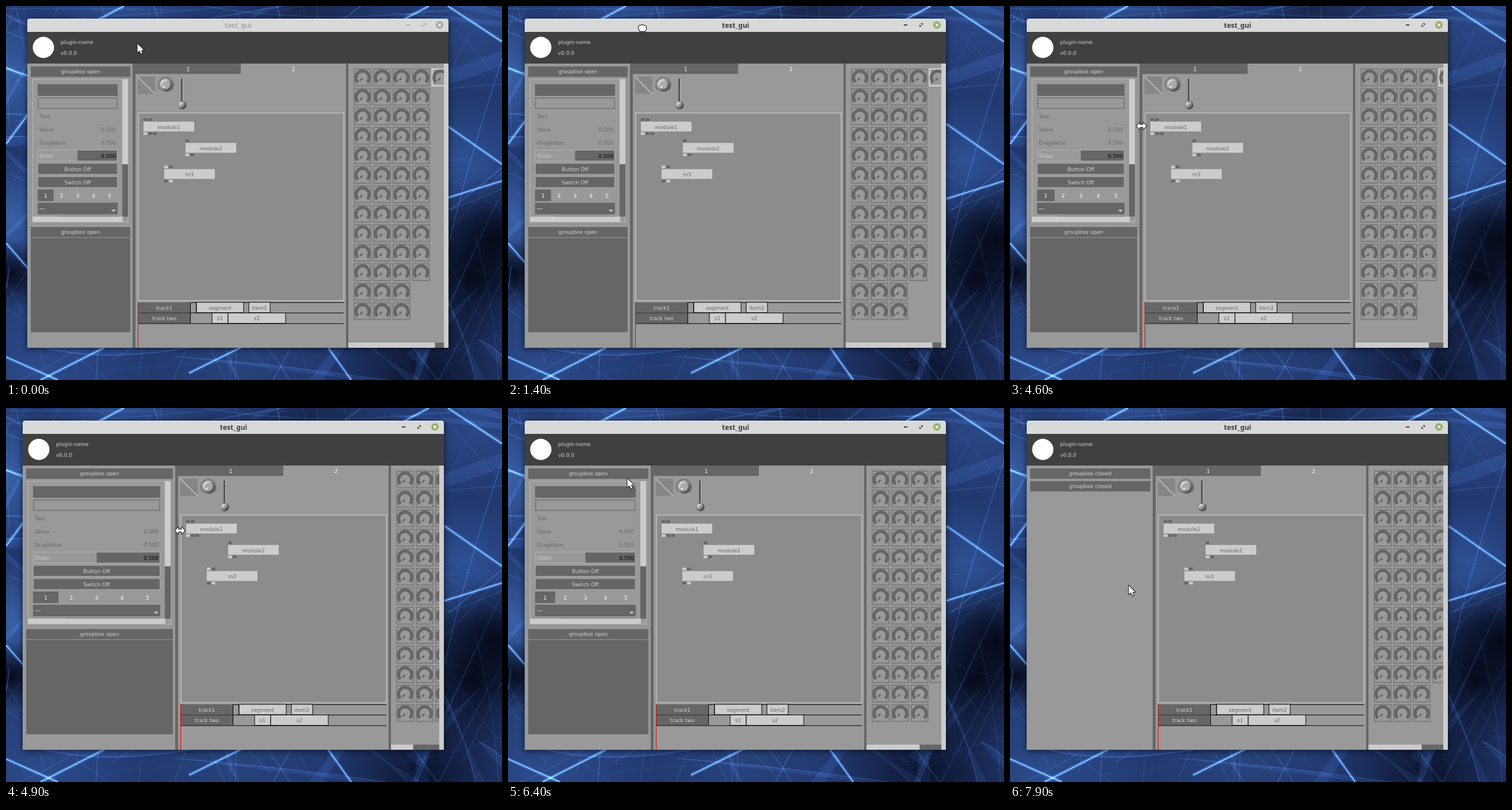
An HTML page with a canvas that plays this animation: 862 by 650 pixels, repeating every 8000 ms.

```html
<!DOCTYPE html>
<html lang="en">
<head>
<meta charset="utf-8">
<title>test_gui</title>
<style>
html, body { margin: 0; width: 100%; height: 100%; overflow: hidden; background: #1c3162; }
canvas { display: block; }
</style>
</head>
<body>
<canvas id="stage" width="862" height="650"></canvas>
<script>
const WIDTH = 862, HEIGHT = 650, LOOP = 8000, STEP = 100;
const BG = '#999', DARK = '#666', LIGHT = '#ccc', TEXT = '#d2d2d2', FONT = '9px "DejaVu Sans", sans-serif';
const stage = document.getElementById('stage').getContext('2d');
let ctx = stage;

// Motion keys: [time, ...values]; values between keys are linear.
const cursorKeys = [
  [0, 228, 65], [100, 228, 58], [200, 228, 58], [500, 241, 38], [1000, 236, 38],
  [1300, 236, 38], [1400, 233, 38], [1500, 233, 38], [1900, 300, 290], [2400, 618, 175],
  [2500, 634, 175], [3600, 634, 175], [3700, 221, 206], [3900, 221, 206], [4100, 214, 206],
  [4500, 214, 206], [4600, 228, 208], [4700, 228, 208], [4900, 302, 212.5], [5100, 305, 213],
  [5600, 305, 213], [5700, 293, 214.5], [6100, 250, 211], [6400, 207, 122], [6500, 204, 97],
  [6600, 203, 93], [6800, 204, 111], [7000, 204, 111], [7200, 204, 132], [7500, 204, 132],
  [7900, 206, 308]
];
const windowKeys = [[0, 8], [500, 8], [1000, 3], [1300, 3], [1400, 0]];
const paneKeys = [[0, 0], [4500, 0], [4600, 13], [4700, 13], [4900, 82], [5000, 90],
  [5600, 90], [5700, 82], [6100, 36]];

function sample(keys, t) {
  const next = keys.findIndex(k => k[0] > t);
  if (next < 0) return keys[keys.length - 1].slice(1);
  const a = keys[next - 1], b = keys[next], p = (t - a[0]) / (b[0] - a[0]);
  return a.slice(1).map((v, i) => v + (b[i + 1] - v) * p);
}

// Drawing helpers; boxes are given by their left, top, right and bottom edges.
function box(x0, y0, x1, y1, color) {
  ctx.fillStyle = color;
  ctx.fillRect(x0, y0, x1 - x0, y1 - y0);
}
function frame(x0, y0, x1, y1, color, width = 1) {
  ctx.strokeStyle = color;
  ctx.lineWidth = width;
  ctx.strokeRect(x0 + width / 2, y0 + width / 2, x1 - x0 - width, y1 - y0 - width);
}
function label(text, x, y, color = TEXT, align = 'center', font = FONT) {
  ctx.font = font;
  ctx.textAlign = align;
  ctx.fillStyle = color;
  ctx.fillText(text, x, y + 3.5);
}
function line(points, color, width = 1) {
  ctx.beginPath();
  points.forEach(([x, y]) => ctx.lineTo(x, y));
  ctx.strokeStyle = color;
  ctx.lineWidth = width;
  ctx.stroke();
}
function disc(x, y, r, fill) {
  ctx.beginPath();
  ctx.arc(x, y, r, 0, 7);
  ctx.fillStyle = fill;
  ctx.fill();
}
function ring(x, y, r, color, width, from = 0, to = 2 * Math.PI) {
  ctx.beginPath();
  ctx.arc(x, y, r, from, to);
  ctx.strokeStyle = color;
  ctx.lineWidth = width;
  ctx.stroke();
}
function ball(x, y, r) {
  const shade = ctx.createLinearGradient(x - r, y - r, x + r, y + r);
  shade.addColorStop(0.15, '#eee');
  shade.addColorStop(0.5, '#999');
  shade.addColorStop(0.9, '#444');
  disc(x, y, r, shade);
}
function clipped(x0, y0, x1, y1, draw) {
  ctx.save();
  ctx.beginPath();
  ctx.rect(x0, y0, x1 - x0, y1 - y0);
  ctx.clip();
  draw();
  ctx.restore();
}

// Wallpaper: soft colour areas crossed by seeded, glowing curves.
function paintWallpaper() {
  let seed = 41;
  const random = (a, b) => {
    seed = (seed * 16807) % 2147483647;
    return a + (b - a) * seed / 2147483647;
  };
  box(0, 0, WIDTH, HEIGHT, '#22396f');
  const glow = (x, y, r, color) => {
    const g = ctx.createRadialGradient(x, y, 0, x, y, r);
    g.addColorStop(0, `rgba(${color},.95)`);
    g.addColorStop(1, `rgba(${color},0)`);
    ctx.fillStyle = g;
    ctx.fillRect(x - r, y - r, 2 * r, 2 * r);
  };
  const bright = '58,98,168', night = '5,9,24';
  glow(0, 120, 130, bright);
  glow(10, 370, 110, bright);
  glow(200, 0, 150, '46,78,142');
  glow(60, 640, 190, '45,76,140');
  glow(400, 620, 150, '40,68,124');
  glow(820, 20, 130, '44,74,136');
  glow(800, 270, 110, '46,82,150');
  glow(10, 465, 60, night);
  glow(850, 405, 110, night);
  glow(810, 470, 130, night);
  glow(730, 640, 170, '10,18,42');
  glow(530, 5, 130, '24,38,74');

  ctx.globalCompositeOperation = 'lighter';
  for (let i = 0; i < 130; i++) {
    const x = random(-60, 920), y = random(-40, 690), angle = random(0, Math.PI), length = random(80, 300);
    const dx = Math.cos(angle) * length, dy = Math.sin(angle) * length;
    const bend = random(-50, 50), alpha = random(.04, .2);
    ctx.beginPath();
    ctx.moveTo(x - dx, y - dy);
    ctx.quadraticCurveTo(x + bend, y - bend, x + dx, y + dy);
    ctx.strokeStyle = `rgba(110,165,240,${alpha})`;
    ctx.lineWidth = random(.5, 2);
    ctx.stroke();
    if (i % 3 === 0) {
      ctx.lineTo(x + dx * .7 + bend, y + dy * .7);
      ctx.fillStyle = 'rgba(70,120,210,.1)';
      ctx.fill();
    }
  }
  const streaks = [
    [762, 335, 862, 304], [318, 638, 415, 590], [0, 108, 40, 122], [0, 412, 40, 458],
    [768, 0, 862, 62], [690, 24, 735, 0], [160, 24, 205, 0], [762, 205, 862, 275],
    [60, 650, 170, 594], [0, 610, 90, 650], [560, 594, 600, 650], [0, 240, 37, 190]
  ];
  for (const [x0, y0, x1, y1] of streaks) {
    line([[x0, y0], [x1, y1]], 'rgba(80,140,230,.25)', 6);
    line([[x0, y0], [x1, y1]], 'rgba(140,195,255,.6)', 1.5);
  }
  ctx.globalCompositeOperation = 'source-over';
}

function drawTitleBar(active) {
  ctx.save();
  ctx.shadowColor = 'rgba(0,0,0,.65)';
  ctx.shadowBlur = 11;
  ctx.shadowOffsetY = 2;
  ctx.beginPath();
  ctx.roundRect(29, 22, 732, 572, [4, 4, 0, 0]);
  ctx.fillStyle = '#d9d9d9';
  ctx.fill();
  ctx.restore();
  box(32, 22, 758, 23, '#eee');

  const ink = active ? '#3c3c3c' : '#aaa';
  label('test_gui', 395.5, 34.5, ink, 'center', 'bold 12px "Noto Sans", sans-serif');
  box(688, 32, 694, 34, ink);
  ctx.fillStyle = ink;
  for (const s of [1, -1]) {
    ctx.beginPath();
    ctx.moveTo(718 + 3 * s, 33 - 3 * s);
    ctx.lineTo(718 - s, 33 - 3 * s);
    ctx.lineTo(718 + 3 * s, 33 + s);
    ctx.fill();
  }
  disc(745.5, 33, 6.5, active ? '#90ae6b' : '#a6a6a6');
  for (const s of [1, -1]) line([[743, 33 - 2.5 * s], [748, 33 + 2.5 * s]], '#fff', 1.6);
}

function drawHeader() {
  box(29, 45, 761, 100, '#404040');
  disc(57, 72, 18.5, '#fff');
  label('plugin-name', 87, 62, TEXT, 'left');
  label('v0.0.0', 87, 81.5, TEXT, 'left');
  box(29, 100, 761, 594, BG);
}

function drawGroupHeader(y, closed, shift) {
  box(35, y, 208 + shift, y + 18, DARK);
  label(closed ? 'groupbox closed' : 'groupbox open', 121.5 + shift / 2, y + 8);
}

function drawControls(shift) {
  const left = 47, right = 186 + shift, width = right - left, middle = (left + right) / 2;
  frame(34, 123, 209 + shift, 380, '#8d8d8d');
  frame(38, 127, 204 + shift, 376, '#b5b5b5');
  box(left, 136, right, 156, DARK);
  frame(left, 159, right, 179, '#7b7b7b', 2);
  label('Text', 50, 191.5, DARK, 'left');
  [['Value', 214], ['DragValue', 237]].forEach(([name, y]) => {
    label(name, 50, y, DARK, 'left');
    label('0.500', right - 3, y, DARK, 'right');
  });
  box(middle, 250, right, 270, DARK);
  frame(left, 250, right, 270, '#b3b3b3');
  label('Slider', 50, 260, LIGHT, 'left');
  label('0.500', right - 3, 260, '#000', 'right');
  [['Button Off', 273], ['Switch Off', 296]].forEach(([name, y]) => {
    box(left, y, right, y + 20, DARK);
    frame(left, y, right, y + 20, '#aaa');
    label(name, middle, y + 10);
  });
  box(left, 319, left + width / 5, 339, DARK);
  for (let i = 0; i < 5; i++) label(i + 1, left + width * (i + .5) / 5, 329, '#fff');
  box(left, 342, right, 362, DARK);
  label('---', 50, 351.5, '#fff', 'left');
  ctx.fillStyle = LIGHT;
  ctx.beginPath();
  ctx.moveTo(right - 11, 354);
  ctx.lineTo(right - 3, 354);
  ctx.lineTo(right - 7, 358);
  ctx.fill();

  box(left + width / 4, 365, right, 366, '#777');
  box(194 + shift, 127, 204 + shift, 275, LIGHT);
  box(194 + shift, 275, 204 + shift, 366, DARK);
  box(38, 366, 195 + shift, 375, LIGHT);
}

function drawLeftPane(shift, t) {
  const firstClosed = t >= 7000, secondClosed = t >= 7500;
  drawGroupHeader(105, firstClosed, shift);
  if (!firstClosed) drawControls(shift);
  const y = firstClosed ? 127 : 384;
  drawGroupHeader(y, secondClosed, shift);
  if (!secondClosed) box(35, y + 19, 208 + shift, y + 183, DARK);
}

function drawPins(x, y, colors) {
  colors.forEach((color, i) => box(x + 8.2 * i, y, x + 8.2 * i + 6.5, y + 4.5, color));
}
function drawModule(name, x, y, inputs, outputs) {
  drawPins(x, y - 6, inputs);
  box(x, y, x + 88, y + 17, LIGHT);
  label(name, x + 44, y + 9, DARK);
  drawPins(x, y + 18.5, outputs);
}

function drawTrack(y, name, segments) {
  box(222, y, 313, y + 18, DARK);
  label(name, 267, y + 9);
  line([[312.5, y], [312.5, y + 18]], '#000');
  for (const [text, x0, x1] of segments) {
    box(x0, y, x1, y + 18, LIGHT);
    frame(x0 - .5, y - .5, x1 + .5, y + 18.5, '#000');
    label(text, (x0 + x1) / 2, y + 9, DARK);
  }
  box(222, y + 18, 579, y + 19, '#000');
}

function drawCenterPane(moved) {
  box(212, 100, 217, 594, DARK);
  box(583, 100, 587, 594, DARK);
  box(217, 100, 400, 118, DARK);
  label('1', 308.5, 109, '#fff');
  label('2', 491.5, 109, '#fff');

  box(221, 123, 251, 153, '#868686');
  line([[221, 123], [251, 153]], LIGHT, 1.3);
  ring(270, 137, 13, '#777', 2, Math.PI * .75, Math.PI * 2.25);
  disc(271, 138, 11, '#5c5c5c');
  ball(270, 137, 10);
  disc(270, 137, 7, '#aaa');
  line([[268, 139], [265, 142]], '#fff', 2);
  box(296, 126, 299, 170, '#555');
  box(299, 126, 300, 170, '#bbb');
  disc(298.5, 172.5, 7, '#444');
  ball(298, 172, 6);

  box(221, 185, 580, 513, '#8c8c8c');
  frame(221, 185, 580, 513, '#b5b5b5', 2);
  drawModule('module1', 231, 201, [DARK, DARK], [LIGHT, DARK, DARK]);
  drawModule('module2', 304, 238, [DARK], [LIGHT, DARK]);
  drawModule('m3', 267, 283.5, [LIGHT, DARK], [DARK, LIGHT]);

  box(313, 515, 579, 516, '#000');
  drawTrack(515, 'track1', [['segment', 323, 405], ['item2', 414, 451]]);
  line([[322.5, 515], [322.5, 533]], '#000');
  drawTrack(533.5, 'track two', [['s1', 350, 378], ['s2', 378, 478]]);
  box(221, 515, 222, 594, moved ? '#e60000' : '#b01a1a');
}

function drawDial(x, y, selected) {
  frame(x - 15.5, y - 15.5, x + 15.5, y + 15.5, selected ? '#ddd' : '#7b7b7b', 2);
  ring(x, y + .5, 11.5, DARK, 5.5, Math.PI * .75, Math.PI * 2.25);
  line([[x - .5, y + 1.5], [x - 4, y + 5.5]], DARK, 3);
}

function drawRightPane(shift) {
  const left = 587 + shift, right = 753, pitch = 33.85;
  clipped(left, 100, right, 585, () => {
    for (let row = 0; row < 13; row++) {
      const count = row === 0 ? 5 : row < 11 ? 4 : 3;
      for (let col = 0; col < count; col++)
        drawDial(611.7 + shift + col * pitch, 124 + row * pitch, col === 4);
    }
  });
  const view = right - left, thumb = view * view / 183;
  box(left, 585, right, 594, DARK);
  box(left, 585, left + thumb, 594, LIGHT);
  box(right, 100, 761, 594, LIGHT);
}

const cursors = {
  arrow: 'M0 0V15.2L3.6 12 6.2 17.6 8.7 16.5 6.2 11.2H11Z',
  resize: 'M-8.5 0L-3-6V-2H3V-6L8.5 0 3 6V2H-3V6Z',
  grab: 'M-6.5 0V-3Q-5.5-5-3.5-4 -2-6.5-.5-4.5 1.5-6.5 3-4 6-5 6.5-2V2L4.5 5.5H-4Z'
};
function drawCursor(t) {
  const [x, y] = sample(cursorKeys, t);
  const kind = t >= 500 && t < 1600 ? 'grab' : t >= 4100 && t < 6200 ? 'resize' : 'arrow';
  const path = new Path2D(cursors[kind]);
  ctx.save();
  ctx.translate(x + .5, y + .5);
  ctx.lineJoin = 'round';
  ctx.strokeStyle = '#111';
  ctx.lineWidth = 2;
  ctx.stroke(path);
  ctx.fillStyle = '#fff';
  ctx.fill(path);
  ctx.restore();
}

const wallpaper = document.createElement('canvas');
wallpaper.width = WIDTH;
wallpaper.height = HEIGHT;
ctx = wallpaper.getContext('2d');
paintWallpaper();
ctx = stage;

function draw(now) {
  const t = Math.floor(now % LOOP / STEP) * STEP;
  const [offset] = sample(windowKeys, t).map(Math.round);
  const [shift] = sample(paneKeys, t).map(Math.round);
  ctx.drawImage(wallpaper, 0, 0);
  ctx.save();
  ctx.translate(offset, 0);
  drawTitleBar(t >= 500);
  drawHeader();
  drawLeftPane(shift, t);
  clipped(212, 100, 761, 594, () => {
    ctx.translate(shift, 0);
    drawCenterPane(shift > 0);
  });
  drawRightPane(shift);
  ctx.restore();
  drawCursor(t);
}

const start = performance.now();
function tick() {
  draw(performance.now() - start);
  requestAnimationFrame(tick);
}
tick();
</script>
</body>
</html>
```
